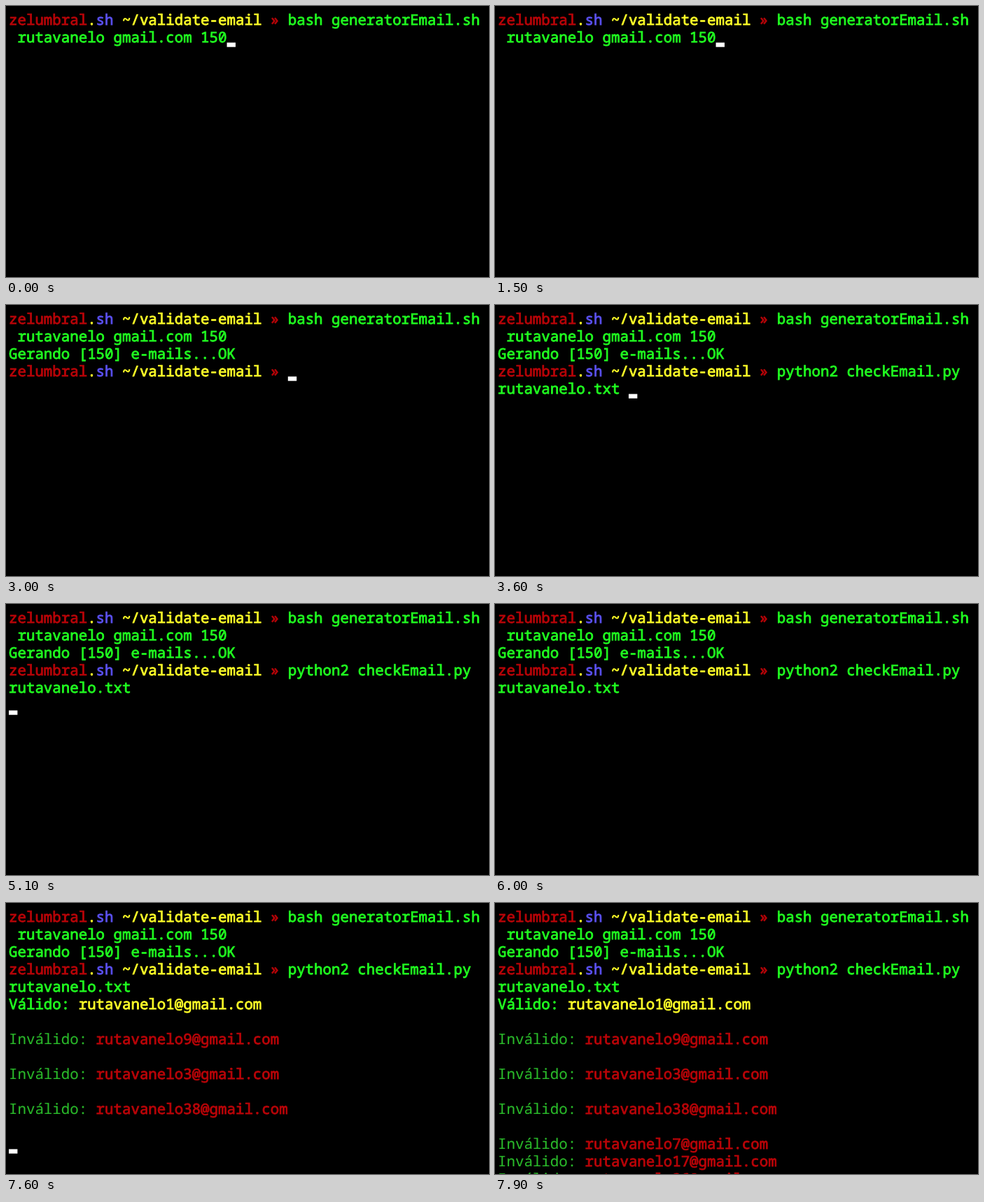
An HTML page that plays this animation: 690 by 388 pixels, repeating every 8 s.

```html
<!DOCTYPE html>
<html lang="pt">
<head>
<meta charset="utf-8">
<title>Terminal</title>
<style>
html, body { margin: 0; width: 100%; height: 100%; overflow: hidden; background: #000; }
svg { display: block; width: 690px; height: 388px; background: #000; }
text {
  font: 20.77px "Noto Sans Mono", "DejaVu Sans Mono", monospace;
  white-space: pre;
  text-rendering: geometricPrecision;
  stroke-width: .85px;
}
.red { fill: #b90408; stroke: #b90408; }
.lime { fill: #20ff20; stroke: #20ff20; }
.green { fill: #2ab82a; stroke: #2ab82a; stroke-width: .15px; }
.blue { fill: #5a50f0; stroke: #5a50f0; }
.yellow { fill: #ffff28; stroke: #ffff28; }
</style>
</head>
<body>
<svg id="screen" viewBox="0 0 690 388"></svg>
<script>
const LOOP = 8000, LEFT = 4, COL = 12.462, ROW = 25, BASE = 27.3;
const NS = "http://www.w3.org/2000/svg";
const screen = document.getElementById("screen");
const user = "rutavanelo";

const prompt = [["red", "zelumbral"], ["yellow", "."], ["blue", "sh"],
  ["yellow", " ~/validate-email "], ["red", "» "]];
const lime = text => ["lime", text];
const invalid = n => [["green", "Inválido: "], ["red", `${user}${n}@gmail.com`]];

// [time shown, row, coloured runs]
const lines = [
  [0, 0, [...prompt, lime("bash generatorEmail.sh")]],
  [0, 1, [lime(` ${user} gmail.com 150`)]],
  [1700, 2, [lime("Gerando [150] e-mails...OK")]],
  [2100, 3, prompt],
  [3200, 3, [lime(" ".repeat(32) + "python2 checkEmail.py")]],
  [3200, 4, [lime(`${user}.txt`)]],
  [7100, 5, [lime("Válido: "), ["yellow", `${user}1@gmail.com`]]],
  [7600, 7, invalid(9)],
  [7600, 9, invalid(3)],
  [7600, 11, invalid(38)],
  [7900, 13, invalid(7)],
  [7900, 14, invalid(17)],
  [7900, 15, invalid(26)]
];

// [time, column, row]; no position means blinked off
const cursorSteps = [
  [0, 25, 1], [900], [1500, 25, 1], [1700, 0, 3], [2100], [2700, 32, 3],
  [3200, 15, 4], [3900, 0, 5], [4500], [5100, 0, 5], [5700], [6300, 0, 5],
  [6900], [7100, 0, 7], [7600, 0, 13], [7900]
];

function add(parent, tag, attrs) {
  const el = document.createElementNS(NS, tag);
  for (const key in attrs) el.setAttribute(key, attrs[key]);
  return parent.appendChild(el);
}

const rows = lines.map(([from, row, runs]) => {
  const el = add(screen, "text", { x: LEFT, y: BASE + row * ROW });
  for (const [color, text] of runs) add(el, "tspan", { class: color }).textContent = text;
  return { from, el };
});
const cursor = add(screen, "rect", { width: 12.4, height: 6.3, fill: "#fff" });

const show = (el, on) => el.setAttribute("visibility", on ? "visible" : "hidden");

function draw(t) {
  for (const { from, el } of rows) show(el, t >= from);
  const [, col, row] = cursorSteps.findLast(step => t >= step[0]);
  show(cursor, row !== undefined);
  if (row !== undefined) {
    cursor.setAttribute("x", LEFT + col * COL);
    cursor.setAttribute("y", 27.4 + row * ROW);
  }
}

const start = performance.now();
function tick() {
  draw((performance.now() - start) % LOOP);
  requestAnimationFrame(tick);
}
tick();
</script>
</body>
</html>
```
